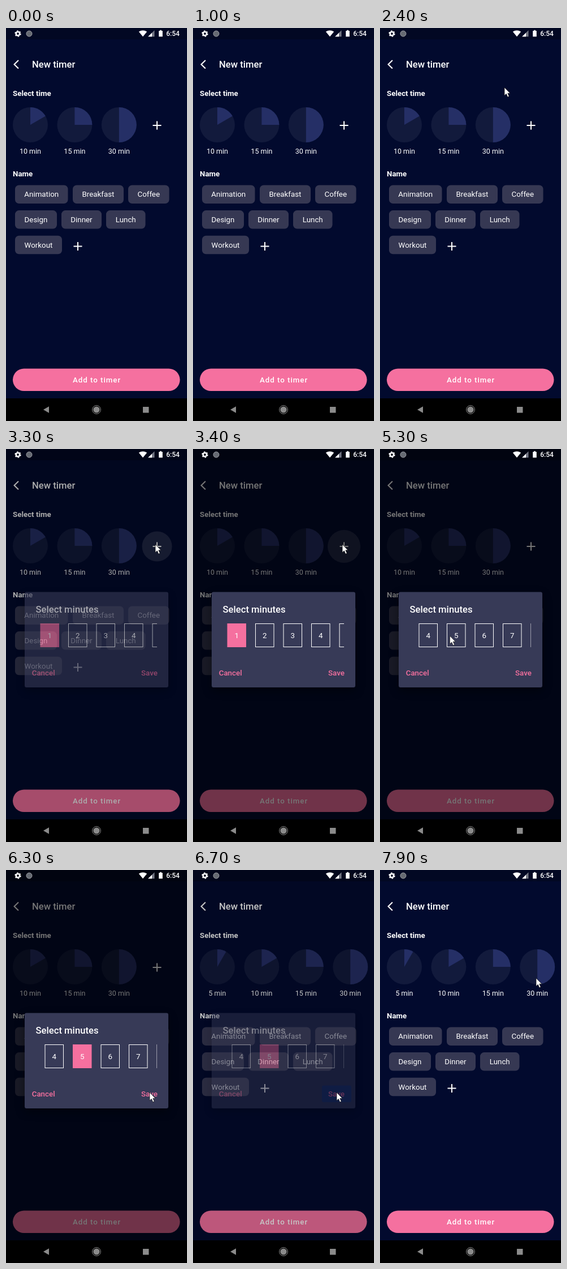
Recreate the animation shown at these times as an HTML page. Size 320 by 694 pixels, loop 8 s.

```html
<!DOCTYPE html>
<html lang="en">
<head>
<meta charset="utf-8">
<title>New timer</title>
<style>
  html, body { margin: 0; width: 100%; height: 100%; overflow: hidden; background: #020a2e; }
  svg { display: block; width: 320px; height: 694px; }
  text { font: 400 13.33px Roboto, sans-serif; fill: #fff; }
  .title { font-size: 16.67px; font-weight: 500; }
  .head { font-weight: 700; }
  .small { font-size: 12.5px; }
  .mid { text-anchor: middle; }
  .action { font-weight: 500; fill: #f5709f; }
  .cta { font-weight: 500; letter-spacing: .95px; }
  .clock { font-size: 12px; font-weight: 500; }
  .plus { stroke: #fff; stroke-width: 2; }
  .shadow { filter: drop-shadow(0 6px 8px rgba(0, 0, 0, .4)); }
</style>
</head>
<body>
<svg viewBox="0 0 320 694">
  <clipPath id="strip"><rect x="53" y="300" width="214" height="58"/></clipPath>
  <rect width="320" height="694" fill="#020a2e"/>
  <path d="M22 57 14.6 64.3 22 71.6" fill="none" stroke="#fff" stroke-width="2.1"/>
  <text class="title" x="46" y="70">New timer</text>
  <text class="head" x="12" y="120">Select time</text>
  <g id="times">
    <circle id="ripple" cx="267" cy="172" fill="#fff"/>
    <path class="plus" d="M259.5 172h15M267 164.5v15"/>
  </g>
  <text class="head" x="12" y="262">Name</text>
  <g id="chips"></g>
  <path class="plus" d="M119.5 385.5h15M127 378v15"/>
  <rect x="12" y="601.5" width="295.5" height="39.5" rx="19.75" fill="#f5709f"/>
  <text class="cta mid" x="160.5" y="626.2">Add to timer</text>
  <rect width="320" height="20" opacity=".25"/>
  <rect id="barrier" width="320" height="654"/>

  <g id="dialog">
    <rect class="shadow" x="33" y="252.5" width="254" height="168.5" rx="3.3" fill="#373a57"/>
    <text class="title" x="52.5" y="288.7">Select minutes</text>
    <g clip-path="url(#strip)"><g id="tiles"></g></g>
    <rect id="splash" x="228" y="380.5" width="52" height="29.5" rx="3" fill="#0a398c"/>
    <text class="action" x="45.7" y="399.7">Cancel</text>
    <text class="action" x="239" y="399.7">Save</text>
  </g>

  <g id="status">
    <circle cx="21" cy="10" r="3.2" fill="none" stroke="#fff" stroke-width="2.6"/>
    <circle cx="21" cy="10" r="4.8" fill="none" stroke="#fff" stroke-width="1.8" stroke-dasharray="2.5 2.527"/>
    <circle cx="41" cy="10" r="5" fill="#666a72" stroke="#9a9ca2"/>
    <path d="M242 15.3 234.8 6.6Q242 1.8 249.2 6.6Z" fill="#fff"/>
    <path d="M262.5 4v11.3h-11.3Z" fill="#737683"/>
    <path d="M258 8.5v6.8h-6.8Z" fill="#fff"/>
    <path d="M270.2 5h1.9V3.7h2.8V5h1.9v10.3h-6.6Z" fill="#fff"/>
    <text class="clock" x="283.3" y="14.2">6:54</text>
  </g>
  <rect y="654" width="320" height="40"/>
  <g fill="#8b8b8b">
    <path d="M66 674l10-5.8v11.6Z"/>
    <circle cx="160" cy="674" r="5.6"/>
    <circle cx="160" cy="674" r="7.4" fill="none" stroke="#8b8b8b"/>
    <rect x="242" y="669" width="10.5" height="10.5"/>
  </g>
  <path id="cursor" d="M0 0V14.2L3.3 11.2 5.7 16.8 8.2 15.7 5.8 10.2H10Z" fill="#fff" stroke="#111" stroke-width=".7"/>
</svg>
<script>
const $ = id => document.getElementById(id);

function add(parent, tag, attrs, label) {
  const el = document.createElementNS("http://www.w3.org/2000/svg", tag);
  for (const k in attrs) el.setAttribute(k, attrs[k]);
  if (label) el.textContent = label;
  $(parent).append(el);
  return el;
}

// Time dials; the 5 minute one waits off screen to the left
const PITCH = 78.4, TILE = 49.5;
[5, 10, 15, 30].forEach((min, i) => {
  const x = 43 + (i - 1) * PITCH, y = 171, r = 31, a = min / 30 * Math.PI;
  add("times", "circle", { cx: x, cy: y, r, fill: "#121a3c" });
  add("times", "path", {
    d: `M${x} ${y}v${-r}A${r} ${r} 0 0 1 ${x + r * Math.sin(a)} ${y - r * Math.cos(a)}Z`,
    fill: "#252f66"
  });
  add("times", "text", { class: "small mid", x, y: 221.7 }, min + " min");
});

[["Animation", 16, 93.5, 0], ["Breakfast", 118, 90, 0], ["Coffee", 216, 72.5, 0],
 ["Design", 16, 74, 1], ["Dinner", 98, 71, 1], ["Lunch", 177, 69.5, 1],
 ["Workout", 16, 83, 2]].forEach(([name, x, width, row]) => {
  const y = 277.5 + row * 44.6;
  add("chips", "rect", { x, y, width, height: 32.5, rx: 7, fill: "#363853" });
  add("chips", "text", { class: "mid", x: x + width / 2, y: y + 20.9 }, name);
});

const tiles = [];
for (let n = 1; n <= 9; n++) {
  const x = 61 + (n - 1) * TILE;
  tiles[n] = add("tiles", "rect", { x, y: 308.5, width: 32.5, height: 41, stroke: "#fff" });
  add("tiles", "text", { class: "mid", x: x + 16.25, y: 333.8 }, n);
}

// Piecewise linear value from [time, value...] keys
function at(keys, t, col = 1) {
  const i = keys.findIndex(k => k[0] > t);
  if (i === 0) return keys[0][col];
  if (i < 0) return keys[keys.length - 1][col];
  const a = keys[i - 1], b = keys[i];
  return a[col] + (b[col] - a[col]) * (t - a[0]) / (b[0] - a[0]);
}

const path = [
  [2400, 220, 105], [2500, 237, 87], [2600, 252, 115], [2800, 264, 168.5], [3500, 264, 168.5],
  [3900, 264, 285], [4100, 253, 310], [4200, 234, 328], [4300, 210, 339], [4400, 210, 339],
  [4700, 121.5, 339], [4900, 121, 339], [5300, 123.5, 330], [5800, 123.5, 330],
  [6000, 175, 358], [6300, 254, 393], [7300, 254, 393], [7500, 264, 310], [7800, 276, 191]
];
const open = [[3200, 0], [3300, .6], [3400, 1], [6500, 1], [6600, .9], [6700, .42], [6800, .05], [6900, 0]];
const scroll = [[4450, 0], [4700, 72], [4800, 98], [4900, 117], [5000, 129], [5100, 136], [5200, 139.5], [5300, 140.5]];
const ripple = [[3100, 0, 10], [3200, .12, 24], [3400, .12, 29], [3700, 0, 29]];
const splash = [[6400, 0], [6600, .45]];

function draw(now) {
  const t = Math.floor(now % 8000 / 100) * 100;
  const show = at(open, t), picked = t < 5700 ? 1 : 5;
  $("dialog").setAttribute("opacity", show);
  $("barrier").setAttribute("opacity", .54 * show);
  $("times").setAttribute("transform", `translate(${t >= 6600 ? PITCH : 0})`);
  $("tiles").setAttribute("transform", `translate(${-at(scroll, t)})`);
  tiles.forEach((el, n) => {
    el.setAttribute("fill", n === picked ? "#f5709f" : "none");
    el.setAttribute("stroke", n === picked ? "#f5709f" : "#fff");
  });
  $("ripple").setAttribute("opacity", at(ripple, t));
  $("ripple").setAttribute("r", at(ripple, t, 2));
  $("splash").setAttribute("opacity", at(splash, t));
  $("cursor").setAttribute("visibility", t < 2400 ? "hidden" : "visible");
  $("cursor").setAttribute("transform", `translate(${at(path, t)} ${at(path, t, 2)})`);
}

const start = performance.now();
(function loop() {
  draw(performance.now() - start);
  requestAnimationFrame(loop);
})();
</script>
</body>
</html>
```
